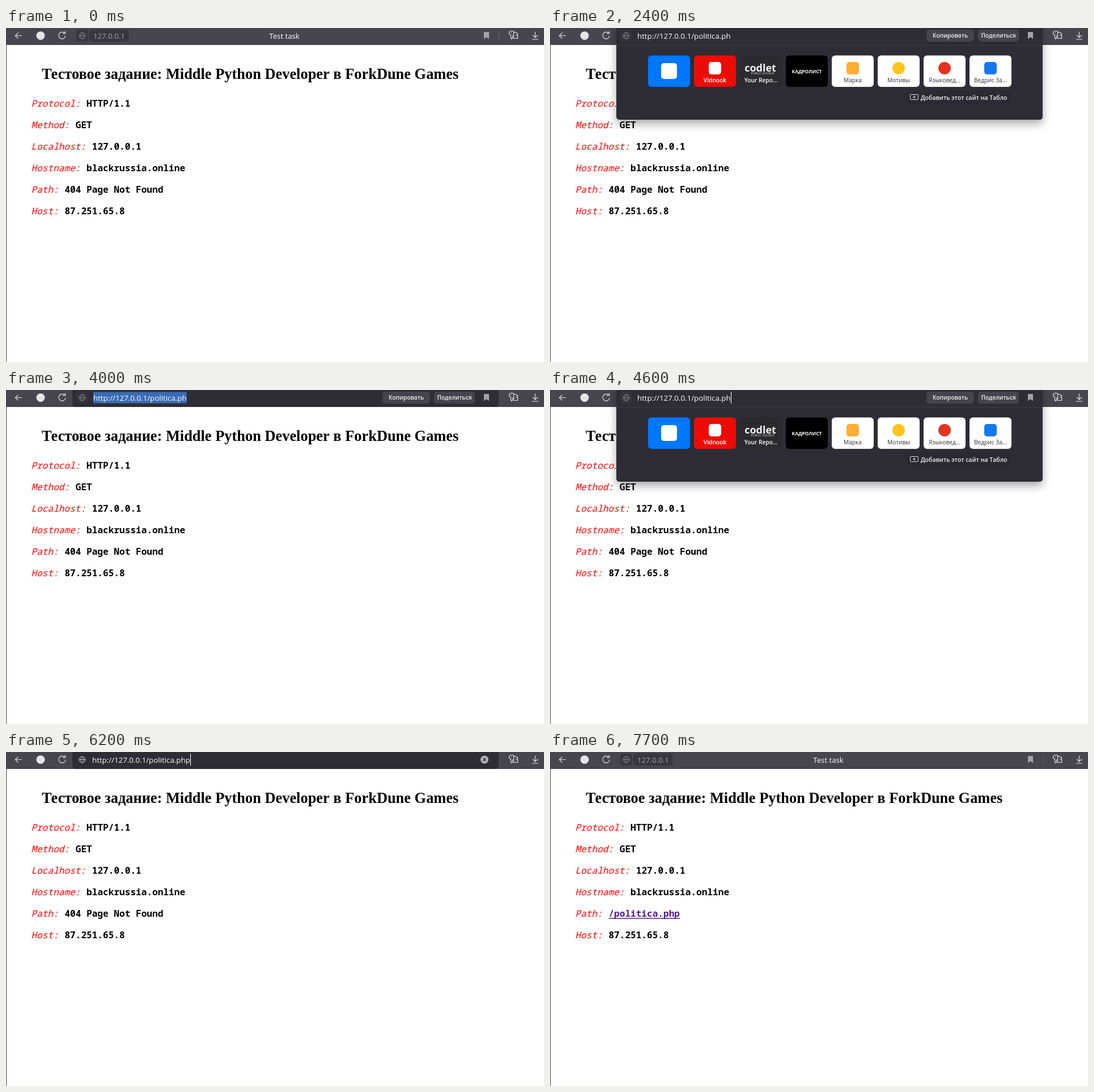
An HTML page with a canvas that plays this animation: 949x590 px, repeating every 8 s.

```html
<!DOCTYPE html>
<html lang="ru">
<head>
<meta charset="utf-8">
<title>Test task</title>
<style>
html, body { margin: 0; width: 100%; height: 100%; overflow: hidden; background: #fff; }
canvas { display: block; }
</style>
</head>
<body>
<canvas id="stage" width="949" height="590"></canvas>
<script>
const ctx = document.getElementById('stage').getContext('2d');
const LOOP = 8000;
const UI = '"Open Sans", sans-serif';
const MONO = '"Noto Sans Mono", monospace';
const DARK = '#2e2d36', LIGHT = '#e4e4e8', GREY = '#a3a3aa';
const BAR_BOTTOM = 30;
const URL_START = 'http://127.0.0.1/politica.ph';

const between = (t, a, b) => t >= a && t < b;

function text(str, x, y, font, color, align = 'left') {
  ctx.font = font;
  ctx.fillStyle = color;
  ctx.textAlign = align;
  ctx.fillText(str, x, y);
}

function box(x, y, w, h, color, radius = 0) {
  ctx.fillStyle = color;
  ctx.beginPath();
  ctx.roundRect(x, y, w, h, radius);
  ctx.fill();
}

function dot(x, y, r, color) {
  ctx.fillStyle = color;
  ctx.beginPath();
  ctx.arc(x, y, r, 0, 7);
  ctx.fill();
}

function stroke(path, color = LIGHT, width = 1.2) {
  ctx.strokeStyle = color;
  ctx.lineWidth = width;
  ctx.stroke(new Path2D(path));
}

function drawPage(found) {
  box(0, 0, 949, 590, '#fff');
  box(0, BAR_BOTTOM, 1, 560, '#47464f');
  text('Тестовое задание: Middle Python Developer в ForkDune Games', 63, 90,
    'bold 26.4px "Liberation Serif", serif', '#000');
  const rows = [
    ['Protocol:', 'HTTP/1.1'],
    ['Method:', 'GET'],
    ['Localhost:', '127.0.0.1'],
    ['Hostname:', 'blackrussia.online'],
    ['Path:', found ? '/politica.php' : '404 Page Not Found'],
    ['Host:', '87.251.65.8']
  ];
  rows.forEach(([label, value], i) => {
    const y = 139 + 38 * i, x = 45.3 + (label.length + 1) * 9.68;
    const link = found && label === 'Path:';
    text(label, 44.5, y, `italic 500 16.13px ${MONO}`, '#f00');
    text(value, x, y, `600 16.13px ${MONO}`, link ? '#551a8b' : '#000');
    if (link) box(x, y + 2, value.length * 9.68, 1.5, '#551a8b');
  });
}

function drawToolbar() {
  box(0, 0, 949, BAR_BOTTOM, '#47464f');
  stroke('M28 13.5H16.5M21.5 8.5L16.5 13.5L21.5 18.5');
  dot(61, 13.5, 7.5, LIGHT);
  stroke('M103.5 9.2A6 6 0 1 0 105 13.5M104.5 5.5V9.7H100.2');
  stroke('M896.5 8L894.5 5.5H889.5L887.5 8V10.5L890.5 13V18L892 19.5L893.5 18V13' +
    'M890.5 8.5H892M895.5 18.5V7.5H899.5L900.5 9.5H902.5V18.5H895.5M899 13H902');
  stroke('M933.5 6.5V17M929 12.5L933.5 17L938 12.5M928 20H939');
}

function drawGlobe(color) {
  stroke('M140 13.5A5.5 5.5 0 1 1 129 13.5A5.5 5.5 0 1 1 140 13.5M129 13.5H140' +
    'M134.5 8C131 11 131 16 134.5 19C138 16 138 11 134.5 8', color, 1);
}

function drawBookmark() {
  ctx.fillStyle = GREY;
  ctx.fill(new Path2D('M843 7H852V19.5L847.5 16L843 19.5Z'));
}

function drawIdleBar(hover) {
  if (hover) box(122, -6, 746, 32, `rgba(255,255,255,${0.19 * hover})`, 6);
  else box(869, 7, 1, 13, '#68676f');
  box(124, 2.5, 21, 21.5, '#38373f', 5);
  box(147, 2.5, 69.5, 21.5, '#38373f', 5);
  drawGlobe('#85848c');
  text('127.0.0.1', 154, 18.5, `13.2px ${UI}`, GREY);
  text('Test task', 491, 18.5, `13.2px ${UI}`, '#fff', 'center');
  drawBookmark();
}

function drawPanel(bottom) {
  ctx.save();
  if (bottom > BAR_BOTTOM) {
    ctx.shadowColor = 'rgba(0,0,0,.35)';
    ctx.shadowBlur = 16;
    ctx.shadowOffsetY = 7;
  }
  box(117, -8, 752, bottom + 8, DARK, 5);
  ctx.restore();
}

function drawUrl(url, x, caret, selected) {
  ctx.font = `13.3px ${UI}`;
  const width = ctx.measureText(url).width;
  if (selected) box(x, 3.5, width, 20, '#3a6cb4');
  text(url, x, 18.5, ctx.font, '#fff');
  if (caret) box(Math.round(x + width), 3, 1, 21, '#fff');
}

// fill, caption, caption color, icon shape, icon color, icon size
const tiles = [
  ['#0077ff', '', '', 'square', '#fff', 28],
  ['#ed0c05', 'Vidnook', '#fff', 'square', '#fff', 22],
  ['#2b2b2d', 'Your Repo...', '#fff'],
  ['#000', '', ''],
  ['#fff', 'Марка', '#333', 'square', '#ffae32', 22],
  ['#fff', 'Мотивы', '#333', 'circle', '#ffc51c', 22],
  ['#fff', 'Языковед...', '#333', 'circle', '#e5331f', 22],
  ['#fff', 'Ведрис За...', '#333', 'square', '#1678ee', 22]
];

function drawTiles() {
  tiles.forEach(([fill, caption, color, shape, tint, size], i) => {
    const x = 173 + 81 * i, mid = x + 37, y = caption ? 71 : 76;
    box(x, 48.5, 74, 55.5, fill, 6);
    if (shape) box(mid - size / 2, y - size / 2, size, size, tint,
      shape === 'circle' ? size / 2 : 5);
    const weight = color === '#fff' ? 600 : 400;
    text(caption, mid, 96, `${weight} 10.2px ${UI}`, color, 'center');
  });
  text('codlet', 371, 77, `bold 18px ${UI}`, '#f2f2f2', 'center');
  text('PUBLIC SOURCE', 375, 82, `5.5px ${UI}`, '#ddd', 'center');
  text('КАДРОЛИСТ', 453, 79.5, `bold 8.4px ${UI}`, '#fff', 'center');
}

function drawButton(label, x, w) {
  box(x, 3, w, 21, '#45444d', 5);
  text(label, x + w / 2, 17, `600 10.2px ${UI}`, '#f0f0f2', 'center');
}

function drawStartPanel(selected, caret, expanded) {
  drawPanel(expanded ? 162 : BAR_BOTTOM);
  box(124, 2.5, 21, 21.5, '#34333c', 5);
  drawGlobe('#85848c');
  drawUrl(URL_START, 154, caret, selected);
  drawButton('Копировать', 664, 84);
  drawButton('Поделиться', 755, 72);
  drawBookmark();
  if (!expanded) return;
  box(117, BAR_BOTTOM, 752, 1, '#3b3a43');
  drawTiles();
  box(628, 111, 186, 24, '#2b2a32', 5);
  stroke('M636.5 117.5H648.5Q649.5 117.5 649.5 118.5V125.5Q649.5 126.5 648.5 126.5' +
    'H636.5Q635.5 126.5 635.5 125.5V118.5Q635.5 117.5 636.5 117.5M642.5 119.5V124.5M640 122H645', LIGHT, 1);
  text('Добавить этот сайт на Табло', 654, 126.5, `600 10.5px ${UI}`, '#f0f0f2');
}

function drawTyping(caret, bottom) {
  drawPanel(bottom);
  drawGlobe('#c4c4ca');
  drawUrl(URL_START + 'p', 152, caret, false);
  dot(844, 13.5, 7, '#b4b4ba');
  stroke('M841.3 10.8L846.7 16.2M846.7 10.8L841.3 16.2', DARK, 1.5);
}

function hoverAt(t) {
  const fadeIn = start => Math.min(1, Math.max(0, (t - start) / 300));
  if (t < 1400) return fadeIn(1200) * 1.2;
  if (t < 4000) return fadeIn(2800);
  return t < 7700 ? 1 : 0;
}

function draw(now) {
  const t = Math.floor(now % LOOP / 100) * 100;
  drawPage(t >= 7100);
  drawToolbar();
  if (between(t, 1400, 2800)) {
    drawStartPanel(t < 1900, between(t, 1900, 2400), t >= 1500);
  } else if (between(t, 4000, 6100)) {
    const caret = between(t, 4600, 5100) || t >= 5600;
    drawStartPanel(t < 4600, caret, t >= 4100);
  } else if (between(t, 6100, 7100)) {
    drawTyping(t < 6700, t < 6300 ? BAR_BOTTOM : 228);
  } else {
    drawIdleBar(hoverAt(t));
  }
  requestAnimationFrame(draw);
}
requestAnimationFrame(draw);
</script>
</body>
</html>
```
